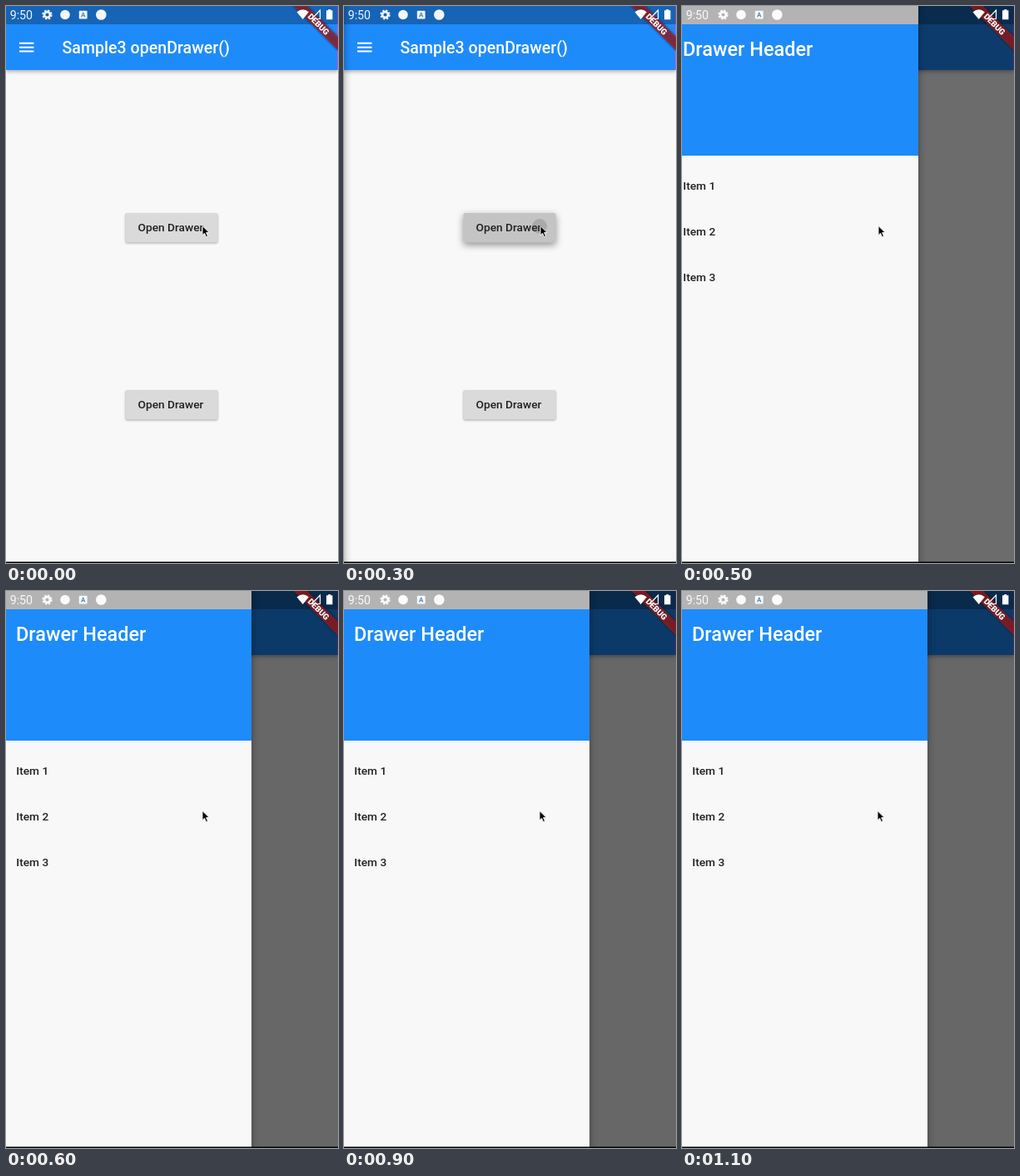
Recreate the animation shown at these times as an HTML page. Size 399 by 670 pixels, loop 1200 ms.

```html
<!DOCTYPE html>
<html lang="en">
<head>
<meta charset="utf-8">
<title>Open drawer</title>
<style>
  html, body { margin: 0; width: 100%; height: 100%; overflow: hidden; background: #f8f8f8; }
  svg { display: block; width: 399px; height: 670px; }
  text { font-family: Roboto, "Noto Sans", sans-serif; font-weight: 500; }
  .label { font-size: 13.7px; fill: #212121; }
  .bar { filter: drop-shadow(0 2px 2px rgba(0, 0, 0, .3)); }
  .raised { filter: drop-shadow(0 1px 1px rgba(0, 0, 0, .32)); }
  .pressed { filter: drop-shadow(0 3px 4px rgba(0, 0, 0, .42)); }
  #drawer { filter: drop-shadow(0 0 5px rgba(0, 0, 0, .4)); }
</style>
</head>
<body>
<svg viewBox="0 0 399 670">
  <rect width="399" height="670" fill="#f8f8f8"/>

  <!-- page -->
  <rect class="bar" y="-10" width="399" height="87" fill="#1e8bfa"/>
  <path d="M16 44.8h17.5M16 49.7h17.5M16 54.6h17.5" stroke="#fff" stroke-width="2"/>
  <text x="67.5" y="56.6" font-size="19.6" fill="#fff">Sample3 openDrawer()</text>
  <path d="M398.5 0v77" stroke="#b45be6"/>
  <rect id="button" class="raised" x="143.5" y="249" width="111" height="35.5" rx="2" fill="#dadada"/>
  <rect id="highlight" x="143.5" y="249" width="111" height="35.5" rx="2"/>
  <circle id="ripple" cx="235" cy="265" fill-opacity=".13"/>
  <text class="label" x="158.5" y="271.3">Open Drawer</text>
  <rect class="raised" x="143.5" y="462" width="111" height="35.5" rx="2" fill="#dadada"/>
  <text class="label" x="158.5" y="484.3">Open Drawer</text>
  <rect id="scrim" width="399" height="670"/>

  <!-- drawer -->
  <g id="drawer">
    <rect y="-20" width="295" height="710" fill="#f8f8f8"/>
    <rect y="22" width="295" height="158" fill="#1e8bfa"/>
    <text x="12" y="59.5" font-size="23.5" fill="#fff">Drawer Header</text>
    <text class="label" x="12.3" y="220.5">Item 1</text>
    <text class="label" x="12.3" y="275.5">Item 2</text>
    <text class="label" x="12.3" y="330.5">Item 3</text>
  </g>

  <!-- status bar and banner -->
  <rect width="399" height="22" fill-opacity=".28"/>
  <g transform="translate(399 -1.5) rotate(45)">
    <rect x="-39" y="27.2" width="78" height="11.7" fill-opacity=".5" style="filter: blur(1.5px)"/>
    <rect x="-39" y="27.2" width="78" height="11.7" fill="#b71c1c" fill-opacity=".63"/>
    <text y="36.6" font-size="9.9" text-anchor="middle" fill="#fff" style="font-weight: 900">DEBUG</text>
  </g>
  <g fill="#fff">
    <text x="4.7" y="15.7" font-size="14.2" fill-opacity=".92" style="font-weight: 400">9:50</text>
    <g fill="none" stroke="#fff" stroke-opacity=".95">
      <circle cx="49.5" cy="10.5" r="3.4" stroke-width="2.6"/>
      <circle cx="49.5" cy="10.5" r="5.2" stroke-width="1.8" stroke-dasharray="2.4 1.684"/>
    </g>
    <circle cx="71" cy="10.5" r="5.8" fill-opacity=".95"/>
    <rect x="87.8" y="5.7" width="9.8" height="9.8" rx="1" fill-opacity=".95"/>
    <path d="M90.5 13.4l2.2-5.6 2.2 5.6M91.3 11.7h2.8" fill="none" stroke="#3979b5"/>
    <circle cx="114.3" cy="10.5" r="6.3" fill-opacity=".95"/>
    <path d="M349.5 7.2q7.2-6 14.4 0l-7.2 8.8z"/>
    <path d="M367.5 15.5l10-10.5v10.5z" fill="none" stroke="#fff" stroke-width="1.2"/>
    <path d="M385 5.3h2.2v-1.3h3v1.3h2.2v11h-7.4z"/>
  </g>

  <path id="cursor" d="M0 0v11.2l2.6-2.4 1.9 4.4 2-.9-1.9-4.2h3.6z" stroke="#fff" stroke-width=".9"/>
  <rect y="668.5" width="399" height="1.5"/>
</svg>
<script>
  const $ = id => document.getElementById(id);
  const STEP = 100, STEPS = 12, WIDTH = 295;
  const slide = [0, .78, .963, 1];       // drawer position, starting at step 3
  const press = [0, 0, .06, .1, .05];    // button highlight
  const rippleSize = [0, 0, 5, 9];

  function draw(now) {
    const n = Math.floor(now / STEP) % STEPS;
    const open = slide[Math.min(Math.max(n - 3, 0), 3)];
    const x = n < 3 ? -WIDTH - 40 : Math.round((open - 1) * WIDTH);
    $("drawer").setAttribute("transform", `translate(${x} 0)`);
    $("scrim").setAttribute("fill-opacity", open * .585);
    $("highlight").setAttribute("fill-opacity", press[n] || 0);
    $("ripple").setAttribute("r", rippleSize[n] || 0);
    $("button").setAttribute("class", n === 2 || n === 3 ? "pressed" : "raised");
    $("cursor").setAttribute("transform", `translate(${n < 8 ? 236 : 235} 264.5)`);
    requestAnimationFrame(draw);
  }
  draw(0);
</script>
</body>
</html>
```
